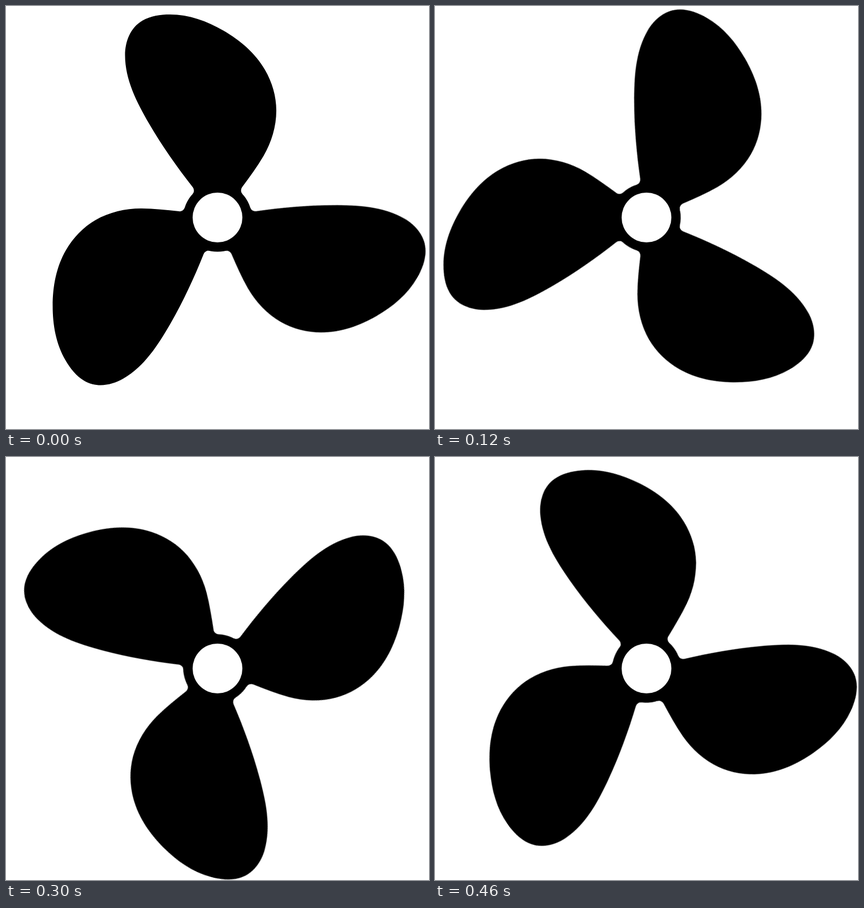
An HTML page that plays this animation: 748x748 px, repeating every 0.48 s.

```html
<!DOCTYPE html>
<html lang="en">
<head>
<meta charset="utf-8">
<title>Propeller</title>
<style>
  html, body { margin: 0; width: 100%; height: 100%; overflow: hidden; background: #fff; }
  svg { display: block; width: 100vw; height: 100vh; }
  .rotor { transform-origin: 0 0; animation: spin 480ms steps(24) -1ms infinite; }
  /* a third of a turn brings the three blades back onto themselves */
  @keyframes spin { to { transform: rotate(120deg); } }
</style>
</head>
<body>
<svg viewBox="-374 -374 748 748">
  <defs>
    <path id="blade" d="M-44.2 -41.2
      A9.5 9.5 0 0 0 -43.7 -53.6
      C-71.5 -89 -98.5 -127 -121 -166
      C-142.7 -203.6 -163.5 -243.6 -163.5 -287
      C-163.5 -311.3 -154 -335.8 -133 -348
      C-118.3 -356.5 -101 -359 -84 -359
      C-50.5 -359 -18.5 -347.3 10.5 -330.5
      C40.1 -313.4 66.9 -290.6 84 -261
      C96.7 -239.1 104 -214.3 104 -189
      C104 -161 95.5 -133.2 81.5 -109
      C70.3 -89.5 56.7 -71.6 43.4 -53.4
      A9.5 9.5 0 0 0 44.2 -41.2 Z"/>
  </defs>
  <g class="rotor">
    <use href="#blade"/>
    <use href="#blade" transform="rotate(120)"/>
    <use href="#blade" transform="rotate(240)"/>
    <circle r="60.5"/>
  </g>
  <circle r="44" fill="#fff"/>
</svg>
</body>
</html>
```
